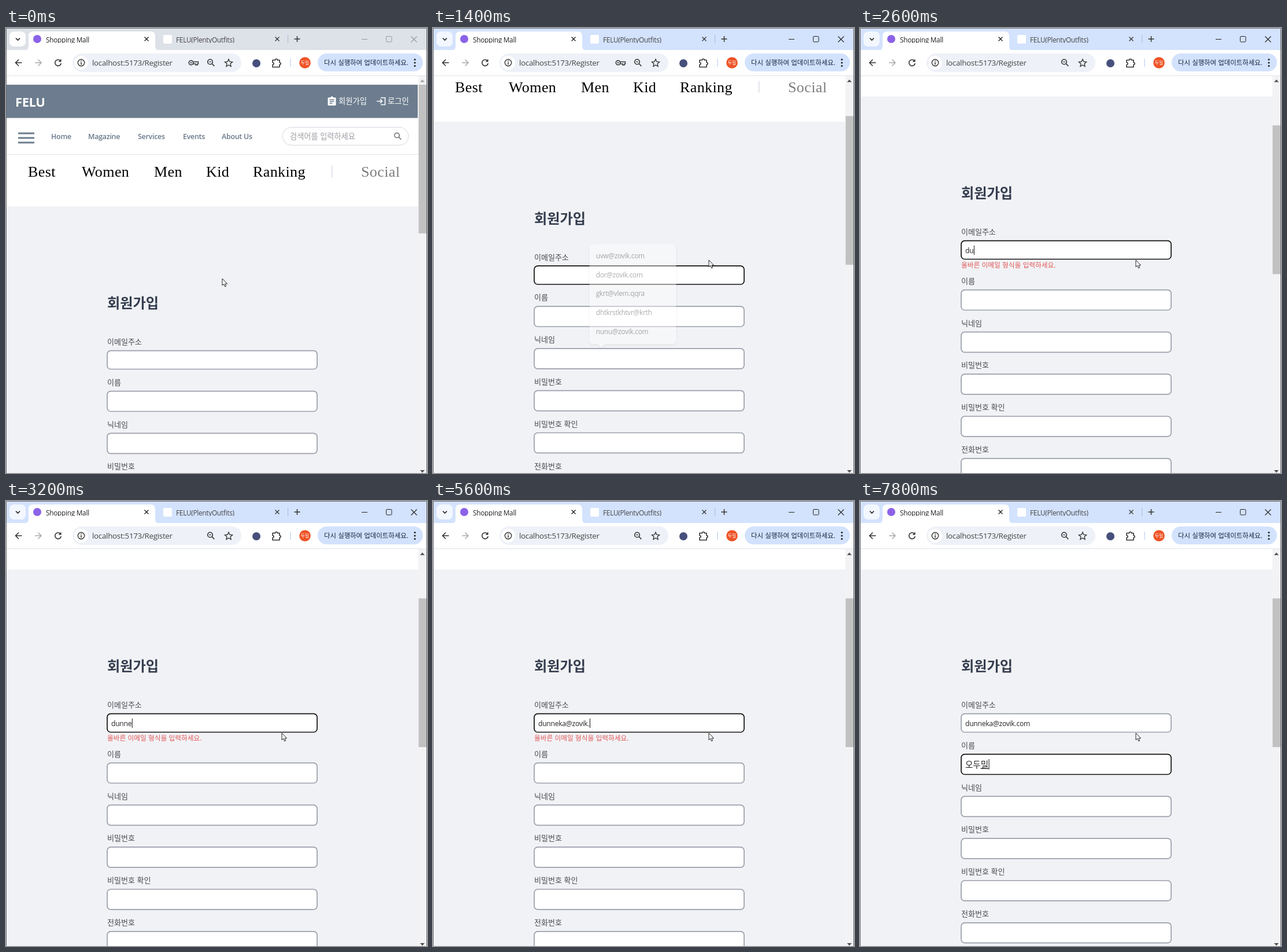
An HTML page that plays this animation: 728x769 px, repeating every 8 s.

```html
<!DOCTYPE html>
<html lang="ko">
<head>
<meta charset="utf-8">
<title>Sign-up form</title>
<style>
html, body { margin: 0; width: 100%; height: 100%; overflow: hidden; background: #fff; }
svg { display: block; width: 728px; height: 769px; }
text { font-family: 'Noto Sans', 'Noto Sans CJK KR', sans-serif; white-space: pre; }
.ui { font-family: 'Open Sans', 'Noto Sans', 'Noto Sans CJK KR', sans-serif; letter-spacing: -.02em; }
.ko { font-family: 'Noto Sans CJK KR', 'Noto Sans', sans-serif; }
.serif { font-family: 'Liberation Serif', serif; letter-spacing: .4px; }
.bold { font-weight: 700; }
.semi { font-weight: 600; }
.mid { font-weight: 500; }
</style>
</head>
<body>
<svg id="stage" viewBox="0 0 728 769"></svg>
<script>
const LOOP = 8000, STEP = 200;
const SLATE = '#6d7d8f';
const EMAIL = 'dunneka@zovik.com';
const SUGGESTIONS = ['uvw@zovik.com', 'dor@zovik.com', 'gkrt@vlem.qqra', 'dhtkrstkhtvr@krth', 'nunu@zovik.com'];

// [time, value] pairs; each value holds until the next one
const emailLength = [[0, 0], [1600, 1], [2600, 2], [2800, 3], [3000, 4], [3200, 5], [3800, 6], [4000, 7],
  [4400, 8], [4600, 10], [5000, 12], [5200, 14], [6000, 17]];
const nameTyped = [[0, ''], [6800, '오'], [7000, '오두'], [7200, '오두미'], [7400, '오두밀']];
const scrolled = [[0, 0], [1400, 146.5], [1600, 190]];
const caretOn = [[0, false], [800, true], [1400, false], [1600, true], [2000, false], [2600, true]];
const valueAt = (keys, t) => keys.filter(([start]) => start <= t).pop()[1];

const text = (x, y, s, size, fill = '#222', cls = 'ui', extra = '') =>
  `<text x="${x}" y="${y}" font-size="${size}" fill="${fill}" class="${cls}" ${extra}>${s}</text>`;
const rect = (x, y, w, h, fill, r = 0, extra = '') =>
  `<rect x="${x}" y="${y}" width="${w}" height="${h}" rx="${r}" fill="${fill}" ${extra}/>`;
const circle = (x, y, r, fill, extra = '') => `<circle cx="${x}" cy="${y}" r="${r}" fill="${fill}" ${extra}/>`;
const line = (d, stroke, width = 1.5, fill = 'none') =>
  `<path d="${d}" stroke="${stroke}" stroke-width="${width}" fill="${fill}"/>`;
const shape = (d, fill) => `<path d="${d}" fill="${fill}"/>`;
const group = (attrs, ...parts) => `<g ${attrs}>${parts.join('')}</g>`;

const cross = (x, y, r, color, w) => line(`M${x - r} ${y - r}l${2 * r} ${2 * r}m0 ${-2 * r}l${-2 * r} ${2 * r}`, color, w);
const lens = (x, y, r, color, w) =>
  circle(x, y, r, 'none', `stroke="${color}" stroke-width="${w}"`) +
  line(`M${x + r * .7} ${y + r * .7}l${r} ${r}`, color, w);

function titleBar(active) {
  const control = active ? '#222' : '#999';
  return [
    rect(0, 0, 728, 39, active ? '#d3e2fd' : '#dde1e8'),
    rect(6, 6, 28, 26, active ? '#f3f7ff' : '#fff', 8),
    line('M17 17.5l3.5 3.5 3.5-3.5', '#222', 1.7),
    shape('M31 39q8 0 8-8V14q0-8 8-8H250q8 0 8 8V31q0 8 8 8Z', '#fff'),
    circle(54, 19, 7, '#8b62e8'),
    rect(272, 12, 15, 15, '#fff', 2),
    group('clip-path="url(#titles)"',
      text(69, 25, 'Shopping Mall', 11.75),
      text(294, 25, 'FELU(PlentyOutfits)', 11.75, '#444')),
    cross(243, 19, 3.5, '#222', 1.4),
    cross(469, 19, 3.5, '#333', 1.3),
    line('M487.5 12v14', '#a9b9d5', 1),
    line('M498.5 19h10M503.5 14v10', '#333', 1.5),
    line('M615 19.5h10', control, 1),
    rect(657.5, 14.5, 9.5, 9.5, 'none', 1.5, `stroke="${control}"`),
    cross(705.5, 19.5, 5, control, 1.1)
  ].join('');
}

function toolbar(showKey) {
  return [
    rect(0, 38, 728, 45, '#fff'),
    line('M27.5 60H17M22 54.5L16.5 60l5.5 5.5', '#333', 1.6),
    line('M50 60H60.5M55.5 54.5L61 60l-5.5 5.5', '#aaa', 1.5),
    line('M94 56.5A5.3 5.3 0 1 0 95.3 61', '#333', 1.6),
    shape('M95.5 53.5v5h-5Z', '#333'),
    rect(115, 44, 292, 32, '#eef1f8', 16),
    circle(130, 60, 12, '#fff'),
    circle(130, 60, 5.7, 'none', 'stroke="#333" stroke-width="1.4"'),
    line('M130 59v4.5M130 56v1.7', '#333', 1.5),
    text(149, 65, 'localhost:5173/Register', 13.3, '#444'),
    showKey ? circle(320, 60, 3.7, 'none', 'stroke="#333" stroke-width="1.6"') +
      circle(320, 60, 1.2, '#333') + line('M323.5 58.5h9v3.5h-1.5v2h-3v-2h-4.5', '#333', 1.4) : '',
    lens(353, 58.5, 4.3, '#333', 1.6), line('M351 58.5h4', '#333', 1.2),
    line('M385 54l1.9 4.2 4.6.5-3.4 3.1.9 4.5-4-2.3-4 2.3.9-4.5-3.4-3.1 4.6-.5Z', '#333', 1.4),
    circle(433, 61, 7, '#46507c'),
    line('M461 55.5h4.5a2 2 0 0 1 4 0h3.5v4a2 2 0 0 1 0 4v4h-12v-4a2 2 0 0 0 0-4Z', '#333', 1.6),
    line('M492 53v14', '#c8d8f2', 1.5),
    circle(517, 60, 9.8, '#ef5327'),
    text(517, 63, '두밀', 8, '#fff', 'ko', 'text-anchor="middle"'),
    rect(539, 44, 182, 31, '#d2e2fd', 15.5),
    text(550, 63.5, '다시 실행하여 업데이트하세요.', 11.4, '#16233c', 'ko'),
    ...[54.5, 60, 65.5].map(y => circle(707, y, 1.6, '#222')),
    rect(0, 82, 728, 1, '#dfe2e8')
  ].join('');
}

function siteHeader() {
  const links = [[78, 'Home'], [142, 'Magazine'], [228, 'Services'], [306, 'Events'], [373, 'About Us']];
  const categories = [[38, 'Best'], [131, 'Women'], [256, 'Men'], [346, 'Kid'], [427, 'Ranking']];
  return [
    rect(0, 83, 713, 225.5, '#fff'),
    rect(0, 98, 712, 57.5, SLATE),
    text(16, 136, 'FELU', 22, '#fff', 'ui bold'),
    rect(556.5, 120, 14, 14, '#fff', 1.5), circle(563.5, 120, 2, '#fff'),
    line('M559.5 124h8M559.5 127h8M559.5 130h5', SLATE, 1.3),
    text(575, 131, '회원가입', 13.3, '#fff', 'ko'),
    line('M648 120.5h7.5v12H648M641 126.5h9.5M647 123l3.5 3.5-3.5 3.5', '#fff', 1.6),
    text(660, 131, '로그인', 13.3, '#fff', 'ko'),
    ...[182, 190, 198].map(y => rect(21, y - 1.5, 28, 3, SLATE)),
    ...links.map(([x, s]) => text(x, 192, s, 12.4, '#687789', 'ui semi')),
    rect(478, 171.5, 218, 31, '#fff', 15.5, 'stroke="#d3d7df"'),
    text(491, 192, '검색어를 입력하세요', 13.2, '#9a9da3', 'ko'),
    lens(676, 185.5, 4.2, '#777', 1.7),
    rect(0, 218, 713, 1, '#e3e5ea'),
    ...categories.map(([x, s]) => text(x, 257, s, 26, '#000', 'serif')),
    rect(563, 238, 1.5, 20, '#d7dde5'),
    text(614, 257, 'Social', 26, '#7d7d7d', 'serif')
  ].join('');
}

function field(top, height, focused) {
  return rect(175, top + .8, 363, height - 1.6, '#fff', 6,
    `stroke="${focused ? '#111' : '#9b9fab'}" stroke-width="1.7"`);
}

function form({ error, focus, email, name }) {
  const shift = error ? 15 : 0;
  const label = (y, s) => text(175, y + 5, s, 13, '#474a50', 'ko mid');
  const rows = ['이름', '닉네임', '비밀번호', '비밀번호 확인', '전화번호'].map((s, i) => {
    const top = 626.8 + 72.8 * i;
    return label(top - 15, s) + field(top, 36.5, i === 0 && focus === 'name');
  });
  const composing = name && `${name.slice(0, -1)}<tspan text-decoration="underline">${name.slice(-1)}</tspan>`;
  return [
    text(175, 484, '회원가입', 24.2, '#343d4e', 'ko bold'),
    label(542, '이메일주소'),
    field(556.8, 33.5, focus === 'email'),
    text(182, 578.5, email, 12.1, '#222', 'ui', 'id="email"'),
    error ? text(175, 604, '올바른 이메일 형식을 입력하세요.', 11.7, '#e25656', 'ko') : '',
    group(`transform="translate(0 ${shift})"`, ...rows,
      text(182, 650.5, composing, 14.5, '#222', 'ko', 'id="name"'))
  ].join('');
}

function popup(items, top, tipBelow, cls = 'ui') {
  const height = 34 * items.length + 10;
  const tip = tipBelow ? `M281 ${top + height - 1}l7.5 7 7.5-7Z` : `M281 ${top + 1}l7.5-7 7.5 7Z`;
  return group('filter="url(#shadow)"', rect(267.5, top, 156, height, '#fff', 7), shape(tip, '#fff')) +
    items.map((s, i) => text(279, top + 25.5 + 34 * i, s, 12.3, '#333', cls)).join('');
}

function suggestions(t) {
  if (t >= 800 && t < 1400) return popup(SUGGESTIONS, 370, true);
  if (t === 1400) return group('opacity=".4" transform="translate(345.5 460) scale(.96) translate(-345.5 -460)"',
    popup(SUGGESTIONS, 370, true));
  if (t >= 1800 && t < 2600) return popup(SUGGESTIONS.filter(s => s[0] === 'd'), 408, false);
  if (t >= 6400 && t < 6800) return popup(['오두밀'], 481, false, 'ko');
  return '';
}

function scrollBar(y) {
  return rect(713, 83, 15, 686, '#f3f3f5') +
    rect(713.5, 98 + y * .37, 13.5, 257, '#c1c1c1') +
    shape('M716 93.5l4-4.5 4 4.5Z', y ? '#505050' : '#a3a3a3') +
    shape('M716 764l4 4.5 4-4.5Z', '#505050');
}

function pointer(t) {
  const ease = u => u * u * (3 - 2 * u);
  const progress = (from, to) => ease(Math.min(1, Math.max(0, (t - from) / (to - from))));
  const a = progress(0, 400), b = progress(800, 1200);
  const x = 374 - 69 * a + 172 * b, y = 433 + 143 * a - 175 * b;
  const overField = t >= 400 && t <= 800;
  return group(`transform="translate(${x} ${y})"`, overField
    ? line('M-2.5-6H-.7L0-5.3.7-6H2.5M0-5.3V5.3M-2.5 6H-.7L0 5.3.7 6H2.5', '#222', 1)
    : line('M0 0V12L2.7 9.5 4.7 14 6.7 13 4.8 9H8.5Z', '#222', 1, '#fff'));
}

function caret(focus, scroll) {
  const typed = document.getElementById(focus);
  const x = 182.5 + typed.getComputedTextLength();
  const [y, h] = focus === 'email' ? [566, 16] : [636, 18];
  return rect(x, y - scroll, 1, h, '#111');
}

const stage = document.getElementById('stage');
const defs = `<defs>
  <clipPath id="page"><rect y="83" width="713" height="686"/></clipPath>
  <clipPath id="titles"><rect x="60" y="8" width="400" height="18"/></clipPath>
  <filter id="shadow" x="-10%" y="-15%" width="120%" height="135%">
    <feDropShadow dx="0" dy="1" stdDeviation="1.8" flood-color="#000" flood-opacity=".25"/>
  </filter></defs>`;

function draw(t) {
  const scroll = valueAt(scrolled, t);
  const email = EMAIL.slice(0, valueAt(emailLength, t));
  const focus = t < 600 ? '' : t < 6400 ? 'email' : 'name';
  const error = email.length > 0 && email.length < EMAIL.length;
  stage.innerHTML = [
    defs,
    rect(0, 0, 728, 769, '#f1f2f5'),
    group('clip-path="url(#page)"', group(`transform="translate(0 ${-scroll})"`,
      siteHeader(), form({ error, focus, email, name: valueAt(nameTyped, t) }))),
    titleBar(t >= 600), toolbar(t < 1600), scrollBar(scroll),
    line('M.5 769V.5H727.5V769', '#6b6f76', 1)
  ].join('');
  const blink = focus && valueAt(caretOn, t) ? caret(focus, scroll) : '';
  stage.insertAdjacentHTML('beforeend', blink + suggestions(t) + pointer(t));
}

const start = performance.now();
let shown = -1;
function tick() {
  const t = Math.floor((performance.now() - start) % LOOP / STEP) * STEP;
  if (t !== shown) draw(shown = t);
  requestAnimationFrame(tick);
}
tick();
</script>
</body>
</html>
```
